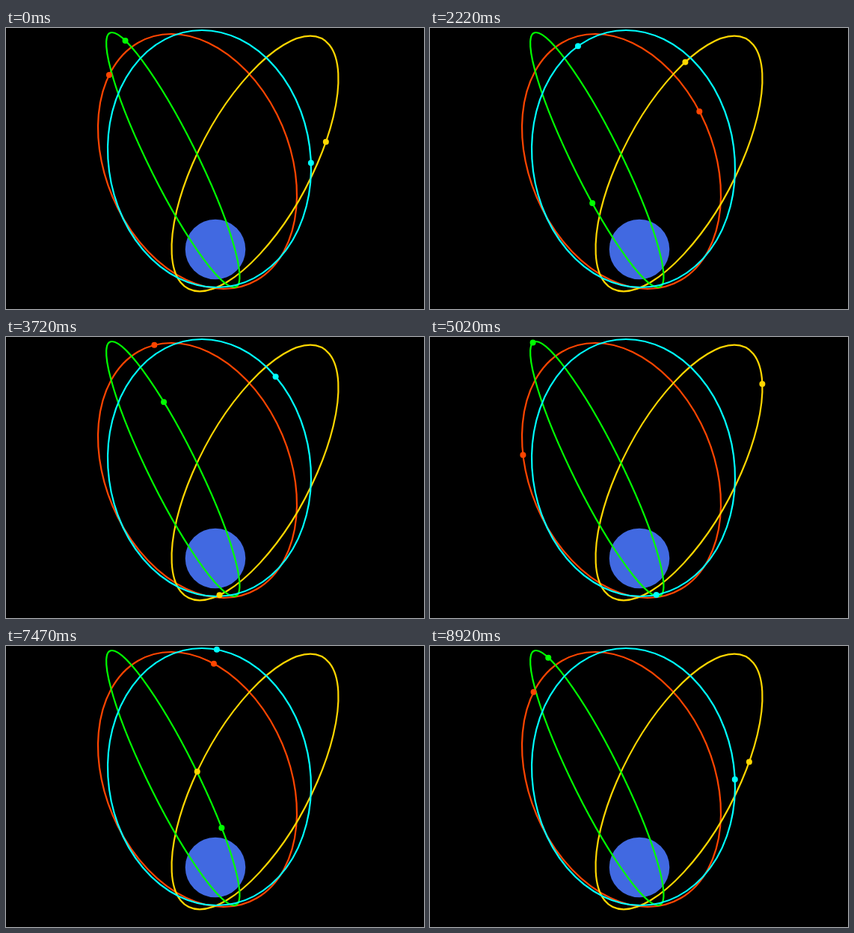
These frames come from a looping animation (559x377 px, 8.94 s). An HTML page with a canvas:

```html
<!DOCTYPE html>
<html lang="en">
<head>
<meta charset="utf-8">
<title>Four orbits</title>
<style>
  html, body { margin: 0; width: 100%; height: 100%; overflow: hidden; background: #000; }
  canvas { display: block; }
</style>
</head>
<body>
<canvas id="stage" width="559" height="377"></canvas>
<script>
const LOOP = 8940, FIRST = 20, STEP = 50;
const TAU = 2 * Math.PI;
const ctx = document.getElementById('stage').getContext('2d');

// Sheared ellipses: centre, half width at mid height, shear, half height.
// ecc, phase, start and rate (per step) describe the Kepler motion.
const orbits = [
  { color: '#ff4500', cx: 256, cy: 179, w: 128.3, k: 35, h: 171,
    ecc: 0.685, phase: 0, start: -1.812, rate: 0.07012 },
  { color: '#ffd700', cx: 333, cy: 182, w: 83.4, k: -74, h: 171.3,
    ecc: 0.68, phase: -0.06, start: 1.141, rate: 0.0701 },
  { color: '#00ff00', cx: 223.3, cy: 177, w: 36, k: 81.6, h: 171,
    ecc: 0.69, phase: 0, start: 2.54, rate: 0.0704 },
  { color: '#00ffff', cx: 272, cy: 175.5, w: 135.6, k: 10, h: 172.5,
    ecc: 0.69, phase: 0, start: 0.849, rate: -0.07014 }
];

function disc(x, y, r, color) {
  ctx.fillStyle = color;
  ctx.beginPath();
  ctx.arc(x, y, r, 0, TAU);
  ctx.fill();
}

function drawOrbit(o) {
  ctx.save();
  ctx.transform(o.w, 0, o.k, o.h, o.cx, o.cy);
  ctx.beginPath();
  ctx.arc(0, 0, 1, 0, TAU);
  ctx.restore();
  ctx.strokeStyle = o.color;
  ctx.lineWidth = 2.2;
  ctx.stroke();
}

// Solves Kepler's equation by Newton's method.
function eccentricAnomaly(mean, ecc) {
  const m = mean - TAU * Math.round(mean / TAU);
  let e = m + 0.85 * ecc * Math.sign(m);
  for (let i = 0; i < 8; i++) {
    e -= (e - ecc * Math.sin(e) - m) / (1 - ecc * Math.cos(e));
  }
  return e;
}

function drawSatellite(o, step) {
  const a = eccentricAnomaly(o.start + o.rate * step, o.ecc) + o.phase;
  const c = Math.cos(a), s = Math.sin(a);
  disc(o.cx + o.k * c + o.w * s, o.cy + o.h * c, 4, o.color);
}

function draw(time) {
  const t = time % LOOP;
  const step = t < FIRST ? 0 : 1 + Math.floor((t - FIRST) / STEP);
  ctx.fillStyle = '#000';
  ctx.fillRect(0, 0, 559, 377);
  disc(280, 297, 40.3, '#4169e1');
  orbits.forEach(drawOrbit);
  orbits.forEach(o => drawSatellite(o, step));
}

let begin = null;
function tick(now) {
  if (begin === null) begin = now;
  draw(Math.max(0, now - begin));
  requestAnimationFrame(tick);
}
draw(0);
requestAnimationFrame(tick);
</script>
</body>
</html>
```
